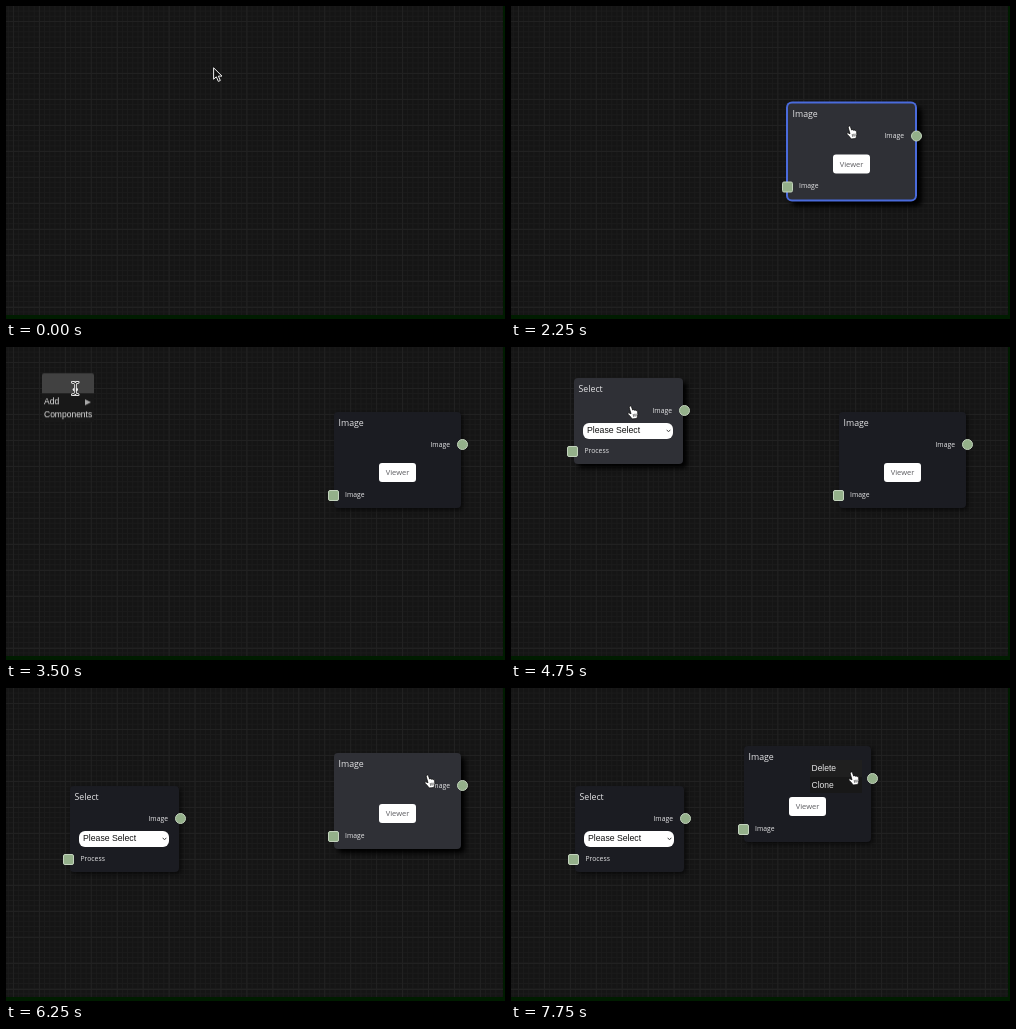
These frames come from a looping animation (499x313 px, 8 s). An HTML page:

```html
<!DOCTYPE html>
<html lang="en">
<head>
<meta charset="utf-8">
<title>Node editor</title>
<style>
:root {
  --dark: #1b1c22;
  --lit: #2f3036;
  --idle: 2px 2px 4px #0009;
  --hover: 4px 4px 5px #000;
  --sel: 0 0 0 2px #4a6bdc, 5px 5px 5px 2px #000;
}
html, body { margin: 0; width: 100%; height: 100%; overflow: hidden; background: #161616; }
.stage {
  position: relative; width: 499px; height: 313px; overflow: hidden;
  font-family: "Open Sans", sans-serif; color: #e4e4e6;
}
.stage * { box-sizing: border-box; }
.grid {
  position: absolute; inset: 0;
  background:
    linear-gradient(90deg, #212121 1px, #0000 1px) 7px 0 / 25.95px 100%,
    linear-gradient(#212121 1px, #0000 1px) 0 15px / 100% 26px,
    linear-gradient(90deg, #1b1b1b 1px, #0000 1px) 1.8px 0 / 5.19px 100%,
    linear-gradient(#1b1b1b 1px, #0000 1px) 0 4.6px / 100% 5.2px,
    #151515;
}
.edge { position: absolute; inset: 0; border: solid #001c00; border-width: 0 2px 4px 0; }

.anim { animation: 8s step-end -2ms infinite; }
.node, .menu, .cursor, .node > *, .cursor svg { position: absolute; }
.node, .menu, .cursor { left: 0; top: 0; }

.node { border-radius: 4px; background: var(--dark); box-shadow: var(--idle); }
.t { transform: translateY(-50%); line-height: 1; white-space: nowrap; font-size: 6.8px; }
.title { left: 4.5px; top: 10.5px; font-size: 8.8px; }
.out { right: 11px; top: 32.5px; }
.socket { width: 11px; height: 11px; background: #94b08a; border: 1px solid #c3d3bd; border-radius: 2px; }
.socket.round { right: -6.5px; top: 27px; border-radius: 50%; }
.button {
  left: 45px; top: 51px; width: 37px; height: 19px; border-radius: 3px;
  background: #fff; color: #5c5c60; font-size: 7.5px; line-height: 19px; text-align: center;
}
.pick {
  left: 9px; top: 45px; width: 90px; height: 15.5px; border-radius: 6px; padding-left: 4px;
  background: #fff; color: #111; font: 8.7px/15.5px "Liberation Sans", Arial, sans-serif;
}
.pick svg { position: absolute; right: 2px; top: 6px; }

.image { width: 127px; height: 96px; opacity: 0; animation-name: imagePos, imageState; }
.select { width: 109px; height: 85.5px; opacity: 0; animation-name: selectPos, selectState; }

.menu { width: 52px; opacity: 0; font: 8.5px/12.6px "Liberation Sans", Arial, sans-serif; color: #e6e6e6; }
.search { height: 20px; background: #414141; border-radius: 2px 2px 0 0; }
.item { background: #181818; padding: 2px; }
.add { position: relative; animation-name: addHover; }
.add::after {
  content: ""; position: absolute; right: 3.5px; top: 5.8px;
  border: solid transparent; border-width: 3px 0 3px 6px; border-left-color: #a8a8a8;
}
.sub { position: absolute; left: 52px; top: 20px; width: 62px; opacity: 0; animation-name: subShow; }
.main { animation-name: mainMenu; }
.first { animation-name: firstHover; }
.second { animation-name: secondHover; }
.node-menu { left: 298.5px; top: 72.3px; animation-name: nodeMenu; }
.node-menu .item:first-child { background: #1f1f1f; }

.cursor { animation-name: cursorPos; }
.cursor svg { left: 0; top: 0; overflow: visible; opacity: 0; }
.arrow { animation-name: arrow; }
.beam { animation-name: beam; }
.hand { animation-name: hand; }

@keyframes imagePos {
  0% { opacity: 0; transform: translate(207px, 61px); }
  21.875% { opacity: 1; transform: translate(207px, 61px); }
  25% { opacity: 1; transform: translate(233px, 80px); }
  28.125% { opacity: 1; transform: translate(277px, 97.5px); }
  31.25% { opacity: 1; transform: translate(328px, 65px); }
  81.25% { opacity: 1; transform: translate(247px, 58px); }
  84.375%, 100% { opacity: 1; transform: translate(233px, 58px); }
}
@keyframes imageState {
  0% { background: var(--lit); box-shadow: var(--hover); }
  25% { background: var(--lit); box-shadow: var(--sel); }
  34.375% { background: var(--dark); box-shadow: var(--idle); }
  78.125% { background: var(--lit); box-shadow: var(--hover); }
  81.25% { background: var(--lit); box-shadow: var(--sel); }
  84.375% { background: var(--lit); box-shadow: var(--hover); }
  90.625%, 100% { background: var(--dark); box-shadow: var(--idle); }
}
@keyframes selectPos {
  0% { opacity: 0; transform: translate(63px, 31px); }
  59.375% { opacity: 1; transform: translate(63px, 31px); }
  62.5% { opacity: 1; transform: translate(82px, 42px); }
  65.625% { opacity: 1; transform: translate(111px, 53px); }
  68.75% { opacity: 1; transform: translate(116px, 55px); }
  71.875% { opacity: 1; transform: translate(72px, 93px); }
  75%, 100% { opacity: 1; transform: translate(64px, 98px); }
}
@keyframes selectState {
  0% { background: var(--lit); box-shadow: var(--hover); }
  62.5% { background: var(--lit); box-shadow: var(--sel); }
  75%, 100% { background: var(--dark); box-shadow: var(--idle); }
}
@keyframes mainMenu {
  0% { opacity: 0; transform: translate(180px, 56px); }
  6.25% { opacity: 1; transform: translate(180px, 56px); }
  21.875% { opacity: 0; transform: translate(36px, 26.3px); }
  40.625% { opacity: 1; transform: translate(36px, 26.3px); }
  59.375%, 100% { opacity: 0; transform: translate(36px, 26.3px); }
}
@keyframes subShow {
  0%, 21.875%, 59.375%, 100% { opacity: 0; }
  9.375%, 46.875% { opacity: 1; }
}
@keyframes addHover {
  0%, 15.625%, 53.125%, 100% { background: #181818; }
  9.375%, 46.875% { background: #222; }
}
@keyframes firstHover {
  0%, 18.75%, 59.375%, 100% { background: #181818; }
  15.625%, 53.125% { background: #222; }
}
@keyframes secondHover {
  0%, 21.875%, 100% { background: #181818; }
  18.75% { background: #222; }
}
@keyframes nodeMenu {
  0% { opacity: 0; }
  90.625%, 100% { opacity: 1; }
}
@keyframes cursorPos {
  0% { transform: translate(207px, 61px); }
  9.375% { transform: translate(203px, 84px); }
  12.5% { transform: translate(219px, 84px); }
  15.625% { transform: translate(246px, 85px); }
  18.75% { transform: translate(256px, 102px); }
  21.875% { transform: translate(265px, 83px); }
  25% { transform: translate(291px, 102px); }
  28.125% { transform: translate(335px, 119px); }
  31.25% { transform: translate(386px, 87px); }
  34.375% { transform: translate(127px, 54px); }
  37.5% { transform: translate(63px, 31px); }
  40.625% { transform: translate(61px, 30px); }
  43.75% { transform: translate(65px, 34px); }
  46.875% { transform: translate(62px, 54px); }
  50% { transform: translate(74px, 55px); }
  53.125% { transform: translate(96px, 55px); }
  59.375% { transform: translate(116px, 58px); }
  62.5% { transform: translate(135px, 69px); }
  65.625% { transform: translate(164px, 80px); }
  68.75% { transform: translate(169px, 82px); }
  71.875% { transform: translate(125px, 120px); }
  75% { transform: translate(230px, 115px); }
  78.125% { transform: translate(418px, 86px); }
  81.25% { transform: translate(337px, 79px); }
  84.375% { transform: translate(323px, 79px); }
  90.625% { transform: translate(325px, 79px); }
  93.75% { transform: translate(333px, 81px); }
  96.875%, 100% { transform: translate(337px, 83px); }
}
@keyframes arrow {
  0%, 34.375%, 75% { opacity: 1; }
  6.25%, 40.625%, 78.125%, 100% { opacity: 0; }
}
@keyframes beam {
  0%, 9.375%, 46.875%, 100% { opacity: 0; }
  6.25%, 40.625% { opacity: 1; }
}
@keyframes hand {
  0%, 34.375%, 75% { opacity: 0; }
  9.375%, 46.875%, 78.125%, 100% { opacity: 1; }
}
</style>
</head>
<body>
<div class="stage">
  <div class="grid"></div>
  <div class="edge"></div>

  <div class="node image anim">
    <div class="t title">Image</div>
    <div class="t out">Image</div>
    <div class="socket round"></div>
    <div class="button">Viewer</div>
    <div class="socket" style="left:-6.5px;top:77.5px"></div>
    <div class="t" style="left:11px;top:83px">Image</div>
  </div>

  <div class="node select anim">
    <div class="t title">Select</div>
    <div class="t out">Image</div>
    <div class="socket round"></div>
    <div class="pick">Please Select
      <svg width="5" height="4"><path d="M.7 .8 2.5 2.8 4.3 .8" fill="none" stroke="#444"/></svg>
    </div>
    <div class="socket" style="left:-7px;top:67.5px"></div>
    <div class="t" style="left:10.5px;top:73px">Process</div>
  </div>

  <div class="menu main anim">
    <div class="search"></div>
    <div class="item add anim">Add<br>Components</div>
    <div class="sub anim">
      <div class="item first anim">Select</div>
      <div class="item second anim">Image</div>
      <div class="item">Gaussian</div>
      <div class="item">Inversion</div>
      <div class="item">Contrast</div>
      <div class="item">Cancer<br>Detection</div>
      <div class="item">Blend</div>
      <div class="item">Process</div>
      <div class="item">Color Map</div>
      <div class="item">HnE</div>
      <div class="item">Custom</div>
      <div class="item">Fatty Liver</div>
      <div class="item">White</div>
    </div>
  </div>

  <div class="menu node-menu anim">
    <div class="item">Delete</div>
    <div class="item">Clone</div>
  </div>

  <div class="cursor anim">
    <svg class="arrow anim" width="10" height="16">
      <path d="M.6 .8V12.2L3.3 9.8 5.3 14.4 7.3 13.5 5.4 9.1H9Z" fill="#111" stroke="#eee"/>
    </svg>
    <svg class="beam anim" width="9" height="15" fill="none" stroke-linecap="round">
      <path id="ibeam" d="M1.5 1.3Q4.3 1.3 4.3 3.2 4.3 1.3 7.1 1.3M4.3 3V12M1.5 13.7Q4.3 13.7 4.3 11.8 4.3 13.7 7.1 13.7M3 8.5H5.6" stroke="#eee" stroke-width="2.6"/>
      <use href="#ibeam"/>
      <path d="M1.5 1.3Q4.3 1.3 4.3 3.2 4.3 1.3 7.1 1.3M4.3 3V12M1.5 13.7Q4.3 13.7 4.3 11.8 4.3 13.7 7.1 13.7" stroke="#111" stroke-width=".9"/>
    </svg>
    <svg class="hand anim" width="12" height="15">
      <path d="M2.6 1.4Q3.6 .4 4.5 1.7L5.6 5Q6.8 4.2 7.4 5.2 8.5 4.6 9 5.6 10.5 5.2 10.7 6.8L10.8 9.5Q10.6 11.5 9.8 13.5L5 14Q3.8 11.6 1 9.2 .4 7.8 1.8 7.8L4 8.8 2.3 3Q2 2 2.6 1.4Z" fill="#fff" stroke="#111" stroke-width=".8"/>
      <path d="M6.2 9 6.6 11.8M7.7 8.8 8 11.6M9.1 8.6V11.3" stroke="#222" stroke-width=".6"/>
    </svg>
  </div>
</div>
</body>
</html>
```
